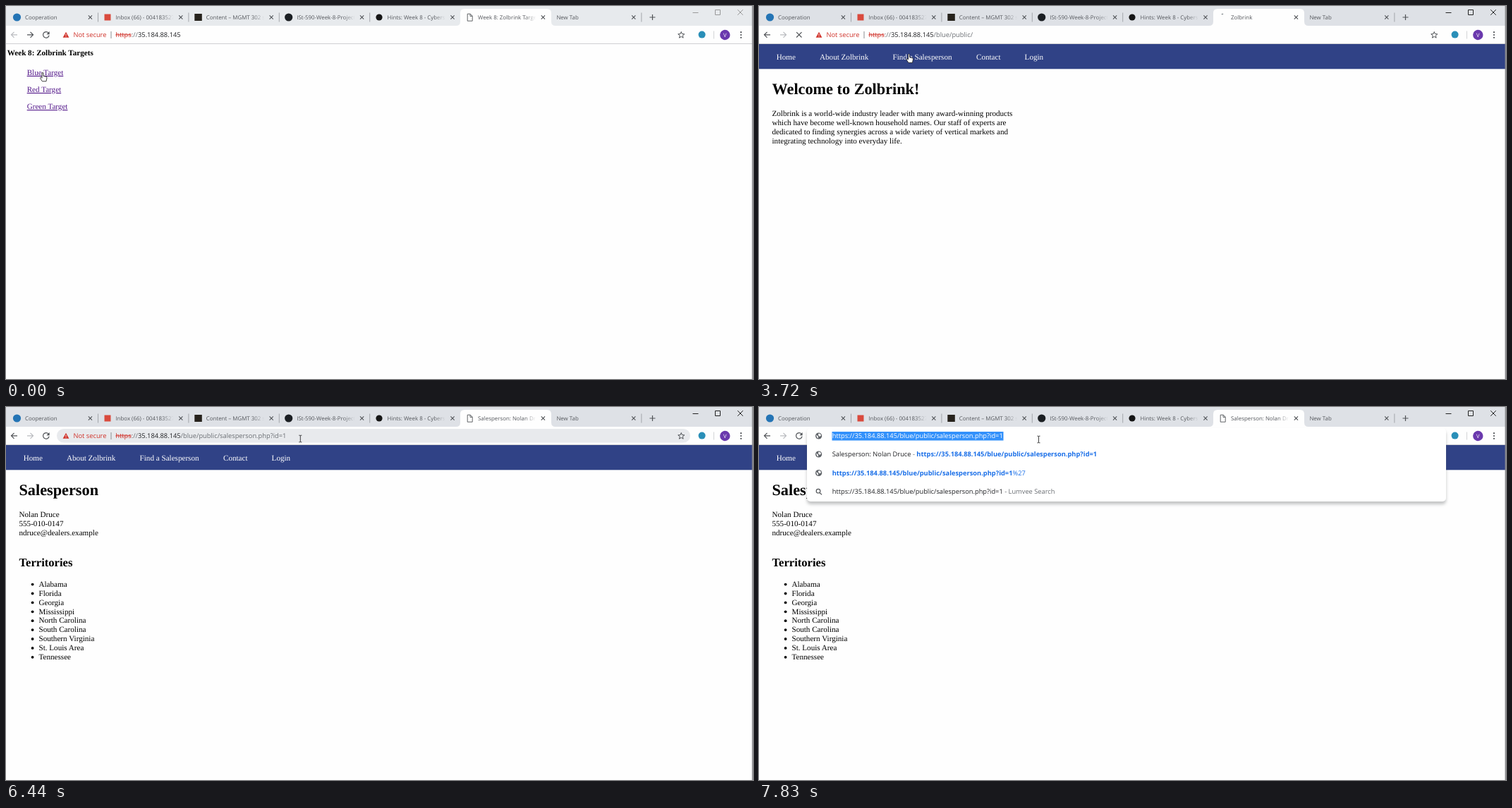
Write an HTML page that moves like this. It is 1059 px wide and 529 px high and loops after 8 s.

```html
<!DOCTYPE html>
<html lang="en">
<head>
<meta charset="utf-8">
<title>Browser session</title>
<style>
html, body { margin: 0; width: 100%; height: 100%; overflow: hidden; background: #fefefe; }
svg { display: block; width: 1059px; height: 529px; }
text { text-rendering: geometricPrecision; white-space: pre; }
.ui { font-family: "Open Sans", "Noto Sans", sans-serif; }
.tab { font-size: 7.9px; fill: #54575c; }
.url { font-size: 9.3px; fill: #6a6e73; }
.page { font: 11.12px "Liberation Serif", "Times New Roman", serif; fill: #000; }
.h1 { font-size: 22.25px; font-weight: bold; }
.h2 { font-size: 16.6px; font-weight: bold; }
.b { font-weight: bold; }
.link { fill: #00e; text-decoration: underline; }
.seen { fill: #551a8b; text-decoration: underline; }
.hot { fill: #e00; text-decoration: underline; }
.nav { fill: #fff; }
.dark { fill: #202124; }
.bad { fill: #d0342c; }
.strike { text-decoration: line-through; }
.blue { fill: #1a6fe8; }
.white { fill: #fff; }
.line { fill: none; stroke: #505357; stroke-width: 1.2; }
.dim { stroke: #b9bbbf; }
</style>
</head>
<body>
<svg id="stage" viewBox="0 0 1059 529"></svg>
<script>
const LOOP = 8000;
const stage = document.getElementById('stage');

// Time ranges in ms during which things are visible
const HOME = '0-1860', ABOUT = '1860-3870', LIST = '3870-5710', PERSON = '5710-8000';
const BUSY = '870-1980,3720-3870,5590-5830';
const IDLE = '0-870,1980-3720,3870-5590,5830-8000';

const on = (when, body) => `<g data-on="${when}">${body}</g>`;
const text = (x, y, s, cls) => `<text x="${x}" y="${y}" class="${cls}">${s}</text>`;
const page = (x, y, s, cls = '') => text(x, y, s, 'page ' + cls);
const span = (cls, s) => `<tspan class="${cls}">${s}</tspan>`;
const rect = (x, y, w, h, fill, more = '') => `<rect x="${x}" y="${y}" width="${w}" height="${h}" fill="${fill}" ${more}/>`;
const dot = (x, y, r, fill) => `<circle cx="${x}" cy="${y}" r="${r}" fill="${fill}"/>`;
const line = (d, cls = '', more = '') => `<path class="line ${cls}" d="${d}" ${more}/>`;
const cross = (x, y, r, more = '') => line(`M${x - r} ${y - r}l${2 * r} ${2 * r}m0 ${-2 * r}l${-2 * r} ${2 * r}`, '', more);

// Tab strip
const PITCH = 128.4;
let fades = '';
function title(i, s, x = 27 + PITCH * i) {
  const end = 109.5 + PITCH * i;
  return text(x, 19, s, 'ui tab').replace('<text', `<text style="fill:url(#fade${i})"`);
}
for (let i = 0; i < 7; i++) {
  const end = 109.5 + PITCH * i;
  fades += `<linearGradient id="fade${i}" gradientUnits="userSpaceOnUse" x1="${end - 16}" x2="${end}" y1="0" y2="0">
    <stop stop-color="#54575c"/><stop offset="1" stop-color="#54575c" stop-opacity="0"/></linearGradient>`;
}

function windowButtons(colour) {
  const s = `style="stroke:${colour};stroke-width:1"`;
  return line('M973.5 9.5h8M1005.5 5.5h7v7h-7z', '', s) + cross(1041, 9, 3.8, s);
}

function tabs() {
  let out = rect(0, 0, 1059, 28, '#dee1e6') + on('0-720', rect(0, 0, 1059, 28, '#e7eaed'));
  out += '<path fill="#fefefe" d="M638 28q6 0 6-6V10q0-6 6-6H767q6 0 6 6V22q0 6 6 6z"/>';
  for (const i of [0, 1, 2, 3, 6]) out += rect(130 + PITCH * i, 9.5, 1, 13, '#a3a6ab');
  for (let i = 0; i < 7; i++) out += cross(119.4 + PITCH * i, 16, 2.6, 'style="stroke-width:1.1"');
  out += dot(15.5, 16, 5.6, '#2474b5') + rect(139.5, 11.5, 9, 9, '#d94a3d') +
    rect(267.3, 11, 10.5, 10, '#26221c') + dot(400.7, 16, 5.6, '#1b1f23') + dot(529, 16, 4.6, '#151515');
  out += title(0, 'Cooperation') + title(1, 'Inbox (66) - 004183527') + title(2, 'Content – MGMT 302 s') +
    title(3, 'ISt-590-Week-8-Project') + title(4, 'Hints: Week 8 - Cyberse') + title(6, 'New Tab', 780.4);
  out += on(HOME, title(5, 'Week 8: Zolbrink Targe')) + on(ABOUT, title(5, 'Zolbrink')) +
    on(LIST, title(5, 'Find a Salesperson')) + on(PERSON, title(5, 'Salesperson: Nolan Druc'));
  out += on(IDLE, line('M654.2 11.2h4l3 3v7h-7zM658 11.4v3h3', '', 'style="stroke-width:.9"'));
  out += line('M912.5 16h8M916.5 12v8');
  return out + on('0-720', windowButtons('#999')) + on('720-8000', windowButtons('#222'));
}

// Toolbar
const HOST = '35.184.88.145';
const address = path => text(155.3, 44.3,
  span('bad strike', 'https') + '://' + span('dark', HOST) + path, 'ui url');

function star(cx, cy) {
  let d = '';
  for (let k = 0; k < 10; k++) {
    const a = k * Math.PI / 5, r = k % 2 ? 2.1 : 4.8;
    d += `${k ? 'L' : 'M'}${(cx + r * Math.sin(a)).toFixed(2)} ${(cy - r * Math.cos(a)).toFixed(2)}`;
  }
  return line(d + 'z', '', 'style="stroke-width:1"');
}

const back = 'M16 40.8H7.5m4-4l-4 4l4 4', forward = 'M30 40.8h8.5m-4-4l4 4l-4 4';
const PERSON_PATH = '/blue/public/salesperson.php?id=1';

function toolbar() {
  let out = rect(0, 28, 1059, 25, '#fefefe') + rect(0, 53, 1059, 1, '#cfd0d2');
  out += on(HOME, line(back, 'dim') + line(forward)) + on('1860-8000', line(back) + line(forward, 'dim'));
  out += on(IDLE, line('M60.2 38.1a4.3 4.3 0 1 0 .9 3.6') + '<path fill="#505357" d="M61.6 36v4.2h-4.2z"/>');
  out += on(BUSY, cross(56.8, 40.8, 3.7));
  out += on('6320-7000', rect(72, 31, 898, 19.6, '#e8eaed', 'rx="9.8"'));
  out += on('7000-8000', rect(72, 31.2, 897.5, 19.4, '#fff', 'rx="9.7" stroke="#86aee6" stroke-width="1.7"'));
  out += '<path fill="#d0342c" d="M85 36.8l4.4 8h-8.8z"/><path stroke="#fff" stroke-width=".9" d="M85 39.6v2.4m0 .8v1"/>';
  out += text(95.5, 44.3, 'Not secure', 'ui url bad') + rect(148.5, 36, 1, 10, '#8a8d91');
  out += on(HOME, address('').replace('://', '://')) + on(ABOUT, address('/blue/public/')) +
    on(LIST, address('/blue/public/territories.php')) + on('5710-7130', address(PERSON_PATH));
  out += on('7130-8000', rect(155, 35, 243, 12.5, '#3391fb') +
    text(155.3, 44.3, span('strike', 'https') + '://' + HOST + PERSON_PATH, 'ui url white'));
  out += star(957.3, 41.3) + dot(986.6, 40.6, 5, '#2a8fb8') + rect(1003, 35.5, 1, 11, '#d3d4d6');
  out += dot(1019.3, 41, 7.2, '#6a39ad') +
    '<text class="ui white" x="1019.3" y="43.7" font-size="7.5" text-anchor="middle">V</text>';
  for (const y of [37.2, 41, 44.8]) out += dot(1042, y, 1.1, '#505357');
  return out;
}

// Pages
function homePage() {
  const link = (y, s, cls = 'seen') => page(29.7, y, s, cls);
  return page(1.8, 69.8, 'Week 8: Zolbrink Targets', 'b') +
    on('0-720,870-8000', link(97.9, 'Blue Target')) + on('720-870', link(97.9, 'Blue Target', 'hot')) +
    link(122, 'Red Target') + link(146.1, 'Green Target');
}

function navBar(width) {
  return rect(0, 54, width, 35.3, '#304286') + page(24.8, 76, 'Home', 'nav') +
    page(86, 76, 'About Zolbrink', 'nav') + page(189.6, 76, 'Find a Salesperson', 'nav') +
    page(308, 76, 'Contact', 'nav') + page(376.6, 76, 'Login', 'nav');
}

const lines = (x, y, list) => list.map((s, i) => page(x, y + i * 12.9, s)).join('');

function aboutPage() {
  return navBar(1058) + page(18.5, 125, 'Welcome to Zolbrink!', 'h1') + lines(18.5, 155.9, [
    'Zolbrink is a world-wide industry leader with many award-winning products',
    'which have become well-known household names. Our staff of experts are',
    'dedicated to finding synergies across a wide variety of vertical markets and',
    'integrating technology into everyday life.']);
}

// '.' bullet with text, '*' bullet with link, '+' link without bullet
const STATES = [
  'Alabama (AL)', '.Test', '*Nolan Druce',
  'Alaska (AK)', '*Hubert Dambrill',
  'Arizona (AZ)', '*Elise Kolvig',
  'Arkansas (AR)', '*Charlotte Ulven',
  'California (CA)', '.Northern California', '+Hubert Dambrill', '.Southern California', '+Sandra Tolvero',
  'Colorado (CO)', '*Elise Kolvig',
  'Connecticut (CT)', '*Roberta Dinkelby',
  'Delaware (DE)', '*Roberta Dinkelby'];

function listPage() {
  let out = navBar(1046) + page(18.5, 125, 'Find a Salesperson', 'h1') +
    page(18.5, 155.9, 'Use the list below to find a salesperson nearby. We are ready to serve you!') +
    page(18.5, 179.8, 'UNITED STATES', 'b');
  let y = 179.9;
  for (const s of STATES) {
    const mark = '.*+'.includes(s[0]) ? s[0] : '';
    y += mark ? 12.9 : 24.15;
    if (mark === '.' || mark === '*') out += rect(35.6, y - 5.2, 4, 4, '#000');
    out += mark ? page(46.5, y, s.slice(1), mark === '.' ? '' : 'link') : page(18.5, y, s);
  }
  return out + rect(1046, 54, 12, 475, '#f1f1f1') + rect(1047, 66, 10, 88, '#c1c1c1') +
    '<path fill="#888" d="M1049.5 62l2.5-2.8l2.5 2.8z"/><path fill="#555" d="M1049.5 525.5l2.5 2.8l2.5-2.8z"/>';
}

function personPage() {
  const areas = ['Alabama', 'Florida', 'Georgia', 'Mississippi', 'North Carolina', 'South Carolina',
    'Southern Virginia', 'St. Louis Area', 'Tennessee'];
  return navBar(1058) + page(18.5, 125, 'Salesperson', 'h1') +
    lines(18.5, 155.9, ['Nolan Druce', '555-010-0147', 'ndruce@dealers.example']) +
    page(18.5, 226.3, 'Territories', 'h2') + lines(46.5, 254.8, areas) +
    areas.map((s, i) => dot(37.6, 251.6 + i * 12.9, 1.9, '#000')).join('');
}

// Address suggestions
function suggestions() {
  const globe = y => dot(84.6, y, 4.6, '#5f6368') +
    `<path fill="#fff" d="M81.4 ${y - 1.4}l2.6 2.2l-.2 2.6q-2.6-1-2.4-4.8zM84.6 ${y - 3.4}q3 0 3.4 3l-2 1.4l-2.2-2.2z"/>`;
  const full = 'https://' + HOST + PERSON_PATH;
  const row = (y, s, cls = '') => text(103.7, y + 3.4, s, 'ui url ' + cls);
  return `<g style="filter:drop-shadow(0 4px 2px rgba(60,64,67,.3))">${rect(68, 30, 906, 104, '#fff', 'rx="5"')}</g>` +
    rect(103.5, 35, 243, 12.5, '#3391fb') + globe(41) + globe(67) + globe(93.5) +
    line('M86.2 121.6l2.8 2.8', '', 'style="stroke-width:1.3"') +
    '<circle class="line" cx="84" cy="119.2" r="2.8"/>' +
    row(41, full, 'white') +
    row(67, span('dark', 'Salesperson: Nolan Druce') + ' - ' + span('blue b', full)) +
    row(93.7, span('blue b', full) + span('blue', '%27')) +
    row(120, span('dark', full) + ' - Lumvee Search');
}

const pointers = {
  hand: 'M-1 .8Q0-.5 1 .8V5l4 1q1.2.4 1 1.6L5 12.6H-.6L-3.5 8.2q-.3-1.3 1-1.2L-1 8z',
  arrow: 'M0 0V8.4L1.9 6.7 3.3 9.8 4.7 9.2 3.3 6.2H5.9z',
  beam: 'M-2-4.8H-.5L0-4.3.5-4.8H2M0-4.3V4.3M-2 4.8H-.5L0 4.3.5 4.8H2'
};

stage.innerHTML = `<defs>${fades}</defs>` + rect(0, 0, 1059, 529, '#fefefe') + tabs() + toolbar() +
  on(HOME, homePage()) + on(ABOUT, aboutPage()) + on(LIST, listPage()) + on(PERSON, personPage()) +
  on('7710-8000', suggestions()) + rect(1057.6, 0, 1.4, 529, '#8b8b8e') +
  '<path id="spin" fill="none" stroke="#7f8489" stroke-width="1.3" stroke-linecap="round"/>' +
  '<path id="pointer" stroke="#111" stroke-width=".8" stroke-linejoin="round"/>';

const parts = [...stage.querySelectorAll('[data-on]')].map(el => ({
  el, spans: el.dataset.on.split(',').map(s => s.split('-').map(Number))
}));
const busy = BUSY.split(',').map(s => s.split('-').map(Number));
const spin = document.getElementById('spin');
const pointer = document.getElementById('pointer');

// time, shape, x, y of each pointer step
const MOVES = [
  [0, 'hand', 52, 94.2], [2660, 'arrow', 102.5, 89.3], [2810, 'arrow', 148, 90], [2930, 'arrow', 175.8, 89.3],
  [3080, 'arrow', 192, 83], [3200, 'hand', 204, 74], [3320, 'hand', 211, 69.5], [3450, 'hand', 212.5, 67.8],
  [4620, 'beam', 135.6, 133], [4760, 'beam', 112, 182], [4890, 'beam', 94, 216.5], [5040, 'beam', 93, 219],
  [5160, 'hand', 92, 222.5], [5280, 'hand', 91.3, 224], [5980, 'beam', 97.5, 217.7], [6180, 'arrow', 384, 51.3],
  [6320, 'beam', 408, 47], [6440, 'beam', 417.3, 45], [7710, 'beam', 404, 45.6], [7830, 'beam', 396.5, 46]];

// Counter-clockwise arc: the head turns steadily, the tail follows half a turn behind
function drawSpinner(t) {
  const run = busy.find(([a, b]) => t >= a && t < b);
  if (!run) return spin.setAttribute('d', '');
  const step = Math.floor((t - run[0] + 1) / 140) * 140 + 60;
  const head = step / 1320 * 2 * Math.PI, tail = Math.max(0, head - Math.PI + .001);
  const at = a => `${(657.6 - 4.9 * Math.sin(a)).toFixed(2)} ${(16.3 - 4.9 * Math.cos(a)).toFixed(2)}`;
  spin.setAttribute('d', `M${at(tail)}A4.9 4.9 0 0 0 ${at(head)}`);
}

function draw(t) {
  for (const { el, spans } of parts)
    el.style.display = spans.some(([a, b]) => t >= a && t < b) ? '' : 'none';
  drawSpinner(t);
  const [, kind, x, y] = MOVES.filter(m => m[0] <= t).pop();
  pointer.setAttribute('d', pointers[kind]);
  pointer.setAttribute('fill', kind === 'beam' ? 'none' : '#fff');
  pointer.setAttribute('transform', `translate(${x} ${y})`);
}

const start = performance.now();
function tick() {
  draw((performance.now() - start) % LOOP);
  requestAnimationFrame(tick);
}
tick();
</script>
</body>
</html>
```
